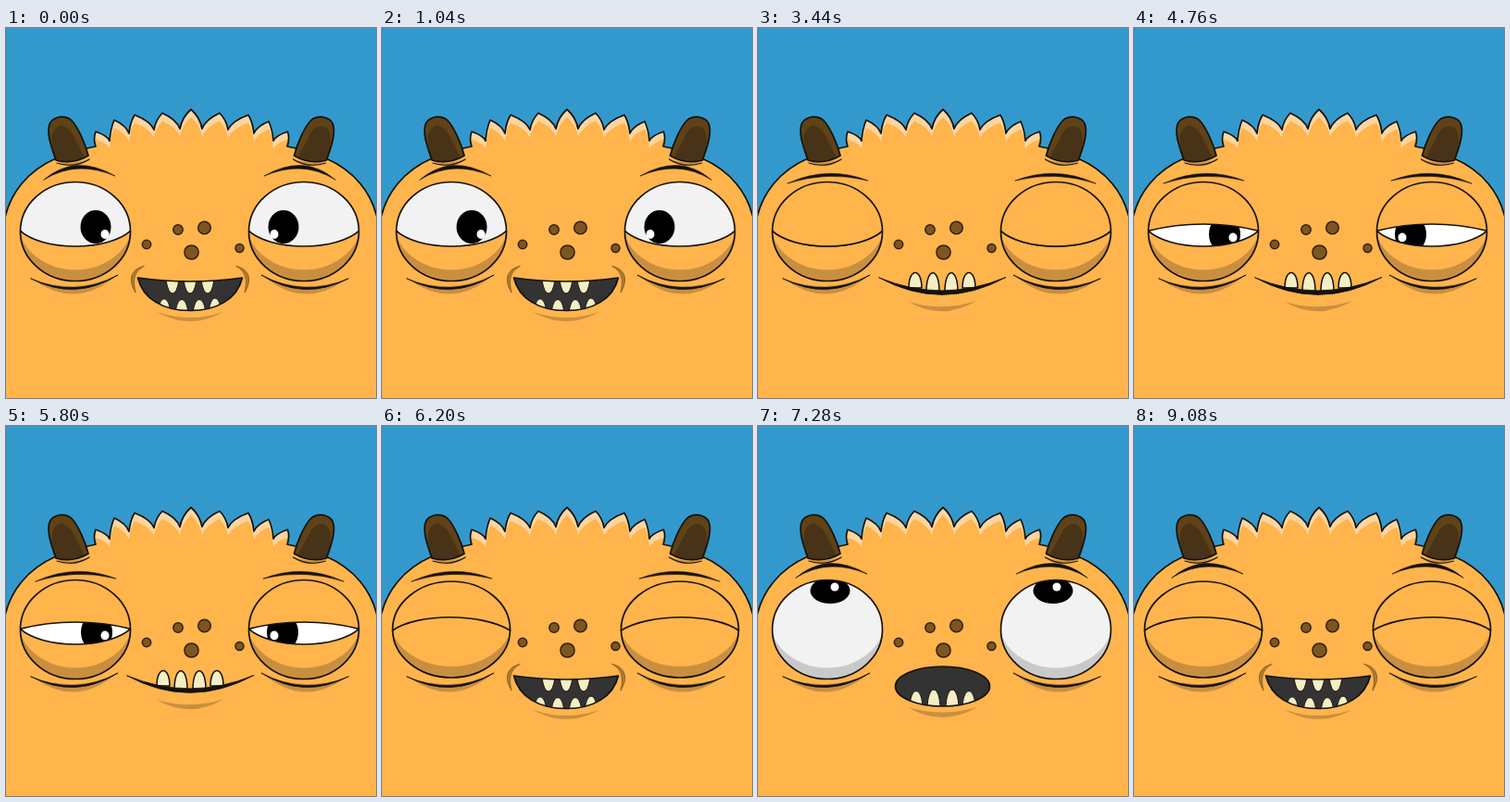
Animation, 400 px wide and 400 px high, one loop 9.16 s. Source, as an HTML page with a canvas:

```html
<!DOCTYPE html>
<html lang="en">
<head>
<meta charset="utf-8">
<title>Monster faces</title>
<style>
  html, body { margin: 0; width: 100%; height: 100%; overflow: hidden; background: #3399cc; }
  canvas { display: block; width: 100vw; height: 100vh; }
</style>
</head>
<body>
<canvas id="stage" width="400" height="400"></canvas>
<script>
const ctx = document.getElementById('stage').getContext('2d');
const LOOP = 9160;
const INK = '#14110d', SKIN = '#ffb44c', SHADE = '#c98f40', TOOTH = '#f4eec4';

function shape(path, fill, stroke, width = 1.7) {
  const p = typeof path === 'string' ? new Path2D(path) : path;
  if (fill) { ctx.fillStyle = fill; ctx.fill(p); }
  if (stroke) { ctx.strokeStyle = stroke; ctx.lineWidth = width; ctx.stroke(p); }
}

function oval(x, y, rx, ry = rx) {
  const p = new Path2D();
  p.ellipse(x, y, rx, ry, 0, 0, Math.PI * 2);
  return p;
}

function clipped(path, draw) {
  ctx.save();
  ctx.clip(typeof path === 'string' ? new Path2D(path) : path);
  draw();
  ctx.restore();
}

function mirrored(sum, draw) {
  draw(false);
  ctx.save();
  ctx.translate(sum, 0);
  ctx.scale(-1, 1);
  draw(true);
  ctx.restore();
}

// Pointed tufts: tips and the valleys between them.
const tips = [[97, 112], [117, 99.5], [139, 94], [169, 92], [200, 88], [231, 92], [262, 94], [284, 101], [304.5, 112]];
const valleys = [[112, 122], [133, 114], [160, 110], [188, 109], [212, 109], [240, 110], [268, 114], [289, 122]];

function tuftPath() {
  let d = 'L97 128 Q94 120 97 112';
  valleys.forEach(([x, y], i) => {
    const [ax, ay] = tips[i], [bx, by] = tips[i + 1];
    d += ` Q${ax + (x - ax) * 0.8} ${ay + (y - ay) * 0.4} ${x} ${y}`;
    d += ` Q${x + (bx - x) * 0.2} ${by + (y - by) * 0.4} ${bx} ${by}`;
  });
  return d + ' Q307 120 304 128';
}

const tufts = tuftPath();
const outline = 'M-2 209 C4 178 24 154 54 141 Q76 132 97 128 ' + tufts +
  ' Q325 132 346 141 C376 154 396 178 402 209';
const bodyPath = outline + ' V440 H-2 Z';
const tuftArea = 'M97 148 ' + tufts + ' V148 Z';

function drawHorn() {
  const horn = 'M54 143 C48 126 43 111 48 102 C53 95 65 94 71 100 C78 107 86 126 89 138 Q72 148 54 143 Z';
  shape(horn, '#5f4217');
  clipped(horn, () => shape('M56 148 C49 128 47 114 54 108 C60 103 67 107 72 115 L85 140 Z', '#483318'));
  shape(horn, null, INK);
}

function drawHornFold() {
  shape('M55 144 Q74 156 91 141 Q75 148 55 144 Z', SHADE);
  shape('M55 146 Q74 152 90 142', null, INK, 1.2);
}

function drawBody() {
  shape(bodyPath, SKIN);
  clipped(tuftArea, () => {
    shape(tuftArea, '#ffd5a0');
    ctx.save();
    ctx.translate(0, 8.5);
    shape(tuftArea, SKIN);
    ctx.restore();
  });
  shape(outline, null, INK);
}

function drawFreckles() {
  [[186, 218, 5.2], [214.5, 216, 6.8], [200.5, 242.5, 7.6], [152, 234, 4.7], [252.5, 238, 4.5]]
    .forEach(([x, y, r]) => shape(oval(x, y, r), '#7c5522', '#30200b', 1.5));
}

function shadeBelow(eye, color, rx, ry) {
  clipped(eye, () => {
    const rim = new Path2D('M0 150 H160 V290 H0 Z');
    rim.addPath(oval(75, 208, rx + 3, ry));
    ctx.fillStyle = color;
    ctx.fill(rim, 'evenodd');
  });
}

function drawPupil(gaze, flipped, lid) {
  if (gaze === 'up') {
    shape(oval(78, 178, 21.5, 14), '#000');
    shape(oval(flipped ? 74 : 83, 174, 4.5), '#fff');
  } else {
    const half = lid === 'half';
    shape(half ? oval(98, 223, 17, 20) : oval(97, 215, 16.5, 18), '#000');
    shape(oval(107, half ? 226.5 : 223, 4.5, 5), '#fff');
  }
}

function drawEye(pose, flipped) {
  const { lid, gaze, brow } = pose;
  const squeezed = lid === 'closed';
  const rx = squeezed ? 63.5 : 59.5, ry = squeezed ? 52 : 53.5;
  const eye = oval(75, 220, rx, ry);
  const wide = gaze === 'up';

  shape(brow === 'low'
    ? 'M32 168 Q75 148 119 165 Q75 154 32 168 Z'
    : 'M41 164 Q75 135 118 160 Q76 142 41 164 Z', INK, INK, 0.6);
  shape('M31 273 Q75 304 118 269 Q77 287 31 273 Z', SHADE);
  shape('M27 271 Q75 292 121 267 Q75 296 27 271 Z', INK, INK, 0.8);

  if (squeezed) {
    shape(eye, SKIN);
    shadeBelow(eye, SHADE, rx, ry);
    shape('M11.5 221 C38 202 108 202 138.5 221', null, INK);
  } else {
    shape(eye, lid === 'half' ? '#fff' : '#f2f2f2');
    if (wide) shadeBelow(eye, '#c9c9c9', rx, ry);
    clipped(eye, () => {
      drawPupil(gaze, flipped, lid);
      const lower = 'M14 218 C38 242 112 242 136 218';
      if (!wide) {
        shape(lower + ' V280 H14 Z', SKIN);
        shadeBelow(eye, SHADE, rx, ry);
        shape(lower, null, INK);
      }
      if (lid !== 'open') {
        const edge = lid === 'half' ? 'M14 219.5 Q75 204.5 136 219.5'
          : wide ? 'M14 222 C38 261 112 261 136 222' : lower;
        shape(edge + ' V160 H14 Z', SKIN);
        shape(edge, null, INK);
      }
    });
  }
  shape(eye, null, INK);
}

const mouths = {
  grin() {
    const lips = 'M142.5 270 Q199 278 255.5 270 C250 293 228 305.5 199 305.5 C170 305.5 148 293 142.5 270 Z';
    mirrored(398, () => {
      shape('M149 257.5 C134 261 132 273 140 286 C137 272 138 264 149 257.5 Z', '#b07a35', '#8a5c22', 0.9);
    });
    shape('M163 307 Q199 327 235 307 Q199 319 163 307 Z', SHADE);
    shape(lips, '#333');
    clipped(lips, () => {
      [180, 199, 218].forEach(x =>
        shape(`M${x - 7} 272 Q${x - 5} 287 ${x} 287 Q${x + 5} 287 ${x + 7} 272 Z`, TOOTH, INK, 1));
      [[171, 291], [190, 292], [209, 292], [226, 290]].forEach(([x, y]) =>
        shape(`M${x - 7} 310 C${x - 6} ${y - 4} ${x + 6} ${y - 4} ${x + 7} 310 Z`, TOOTH, INK, 1));
    });
    shape(lips, null, INK);
  },
  smile() {
    [[170, 264, 281], [189, 263, 285], [209, 263, 285], [228, 264, 281]].forEach(([x, y, base]) =>
      shape(`M${x - 7} ${base} C${x - 7} ${y - 5} ${x + 7} ${y - 5} ${x + 7} ${base} Z`, TOOTH, INK, 1.5));
    shape('M131 270 Q199 298 268 269.5 Q199 307 131 270 Z', INK, INK, 0.8);
    shape('M163 296 Q199 317 236 295 Q199 307 163 296 Z', SHADE);
  },
  gasp() {
    const lips = oval(199.5, 281.5, 51, 21.5);
    shape('M162 304 Q199 326 237 304 Q199 315 162 304 Z', SHADE);
    shape(lips, '#333');
    clipped(lips, () => [171, 190, 210, 228].forEach((x, i) => {
      const y = i % 3 ? 282 : 284;
      shape(`M${x - 7} 306 C${x - 7} ${y - 4} ${x + 7} ${y - 4} ${x + 7} 306 Z`, TOOTH, INK, 1);
    }));
    shape(lips, null, INK);
  }
};

// Each key holds until the next one; properties carry over.
const timeline = [];
let current = { lid: 'open', gaze: 'in', brow: 'high', mouth: 'grin', y: 0 };
function key(time, change) {
  current = { ...current, ...change };
  timeline.push({ time, ...current });
}

key(0, {});
key(840, { lid: 'half' });
key(920, { lid: 'shut' });
key(1040, { lid: 'open' });

key(2320, { lid: 'half' });
key(2400, { lid: 'shut' });
key(2480, { lid: 'half', mouth: 'smile' });
key(2560, { lid: 'open' });

for (const [start, length] of [[3360, 280], [4760, 240]]) {
  key(start, { lid: 'half', brow: 'low' });
  key(start + 80, { lid: 'shut' });
  key(start + length - 80, { lid: 'half' });
  key(start + length, { lid: 'open', brow: 'high' });
}

key(5800, { lid: 'half', brow: 'low' });
key(5880, { lid: 'shut' });
key(5960, { lid: 'closed', mouth: 'grin' });
for (const [down, up] of [[6040, 6200], [6320, 6480], [6600, 6720]]) {
  key(down, { y: 13 });
  key(up, { y: 0 });
}

key(6880, { lid: 'half', gaze: 'up', brow: 'high', mouth: 'gasp' });
key(6960, { lid: 'open', y: -5 });
key(7040, { y: -9 });
key(7160, { y: -4 });
key(7280, { y: 0 });

key(8120, { lid: 'half' });
key(8200, { lid: 'shut' });
key(8280, { lid: 'open' });
key(8960, { lid: 'half' });
key(9080, { lid: 'closed', gaze: 'in', mouth: 'grin' });

function draw(time) {
  const pose = timeline.findLast(k => k.time <= time);
  ctx.fillStyle = '#3399cc';
  ctx.fillRect(0, 0, 400, 400);
  ctx.save();
  ctx.translate(0, pose.y);
  // The horns tuck behind the forehead when the head ducks.
  if (pose.y > 0) {
    mirrored(400.5, drawHorn);
    drawBody();
  } else {
    drawBody();
    mirrored(400.5, () => { drawHornFold(); drawHorn(); });
  }
  drawFreckles();
  mirrored(397, flipped => drawEye(pose, flipped));
  mouths[pose.mouth]();
  ctx.restore();
}

ctx.lineJoin = 'round';
ctx.lineCap = 'round';
const start = performance.now();
function tick() {
  draw((performance.now() - start) % LOOP);
  requestAnimationFrame(tick);
}
tick();
</script>
</body>
</html>
```
